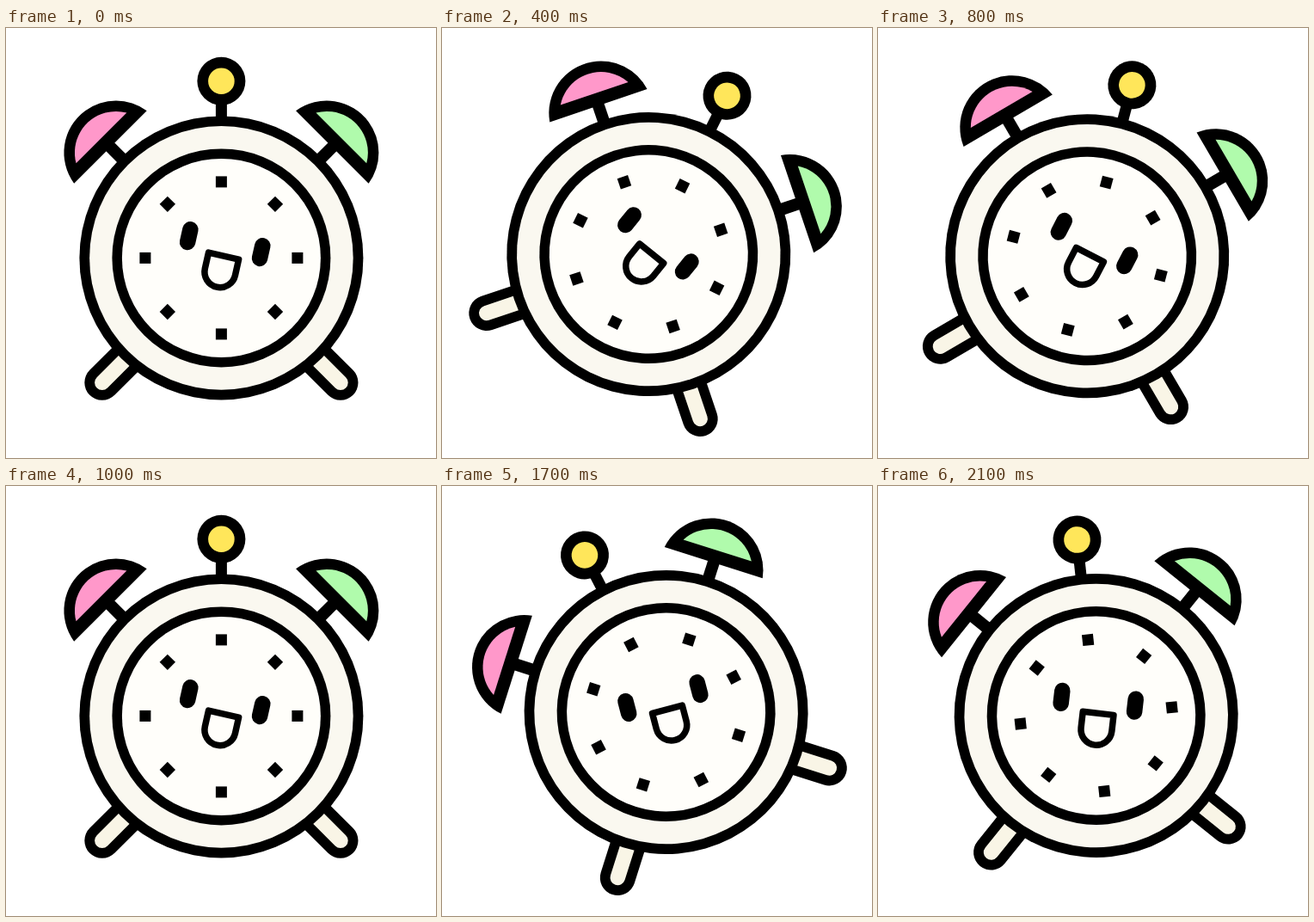
Recreate the animation shown at these times as an HTML page with a canvas. Size 500 px wide and 500 px high, loop 2200 ms.

```html
<!DOCTYPE html>
<html lang="en">
<head>
<meta charset="utf-8">
<title>Rocking alarm clock</title>
<style>
  html, body { margin: 0; width: 100%; height: 100%; overflow: hidden; background: #fff; }
  canvas { display: block; width: 100vmin; height: 100vmin; }
</style>
</head>
<body>
<canvas id="stage" width="500" height="500"></canvas>
<script>
const ctx = document.getElementById('stage').getContext('2d');
const LOOP = 2200, STEP = 100, RAD = Math.PI / 180;
const INK = '#000', RING = '#faf8f0', DIAL = '#fffefa', LEG = '#f9f5e6';
const PINK = '#ff98ca', GREEN = '#b0fbac', YELLOW = '#ffe65a';

// Tilt in degrees over the loop: [time, angle], linear in between.
const TILT = [
  [0, 0], [200, 12.4], [500, 33.3], [600, 29.4], [1000, 0],
  [1300, -16.5], [1600, -32], [1700, -27.4], [2100, -6.2], [2200, 0]
];

function tiltAt(t) {
  const i = TILT.findIndex(key => key[0] > t);
  const [t0, a0] = TILT[i - 1], [t1, a1] = TILT[i];
  return a0 + (a1 - a0) * (t - t0) / (t1 - t0);
}

function turned(deg, draw) {
  ctx.save();
  ctx.rotate(deg * RAD);
  draw();
  ctx.restore();
}

function disc(x, y, r, color) {
  ctx.beginPath();
  ctx.arc(x, y, r, 0, 2 * Math.PI);
  ctx.fillStyle = color;
  ctx.fill();
}

function line(x, y0, y1, width, color, cap = 'butt') {
  ctx.beginPath();
  ctx.moveTo(x, y0);
  ctx.lineTo(x, y1);
  ctx.lineWidth = width;
  ctx.lineCap = cap;
  ctx.strokeStyle = color;
  ctx.stroke();
}

// Part of a circle above a chord that lies `rise` over its centre.
function cap(y, r, rise, color) {
  const a = Math.asin(rise / r);
  ctx.beginPath();
  ctx.arc(0, y, r, Math.PI + a, -a);
  ctx.closePath();
  ctx.fillStyle = color;
  ctx.fill();
}

function bell(side, color) {
  turned(side * 45, () => {
    line(0, -185, -158, 14, INK);
    cap(-173.2, 60.5, 9.2, INK);
    cap(-173.2, 48, 24, color);
  });
}

function leg(side) {
  turned(side * -45, () => {
    const x = side * -4.5;
    line(x, 150, 200.5, 41, INK, 'round');
    line(x, 150, 200.5, 17.5, LEG, 'round');
  });
}

function face() {
  ctx.save();
  ctx.translate(4.3, -16.3);
  ctx.rotate(12.7 * RAD);
  for (const x of [-43, 43]) line(x, -7.5, 7.5, 18.5, INK, 'round');
  ctx.beginPath();
  ctx.moveTo(-16.5, 14);
  ctx.lineTo(19.5, 14);
  ctx.lineTo(19.5, 33);
  ctx.arc(1.5, 33, 18, 0, Math.PI);
  ctx.closePath();
  ctx.lineWidth = 7.5;
  ctx.lineJoin = 'round';
  ctx.stroke();
  ctx.restore();
}

function clock() {
  bell(-1, PINK);
  bell(1, GREEN);
  leg(-1);
  leg(1);
  line(0, -185, -155, 13, INK);
  disc(0, -205.6, 28, INK);
  disc(0, -205.6, 15.3, YELLOW);

  disc(0, 0, 165, INK);
  disc(0, 0, 153.3, RING);
  disc(0, 0, 127, INK);
  disc(0, 0, 115.5, DIAL);
  for (let i = 0; i < 8; i++) turned(i * 45, () => line(0, -95, -82, 13, INK));
  face();
}

function frame(now) {
  const t = Math.floor(now % LOOP / STEP) * STEP;
  const tilt = tiltAt(t);
  const sway = Math.sin(3 * tilt * RAD);
  ctx.fillStyle = '#fff';
  ctx.fillRect(0, 0, 500, 500);
  ctx.save();
  ctx.translate(250.4 - 10.3 * sway, 267.4 - 4.5 * sway * sway);
  turned(tilt, clock);
  ctx.restore();
}

let start;
function tick(now) {
  start ??= now;
  frame(now - start);
  requestAnimationFrame(tick);
}
frame(0);
requestAnimationFrame(tick);
</script>
</body>
</html>
```
